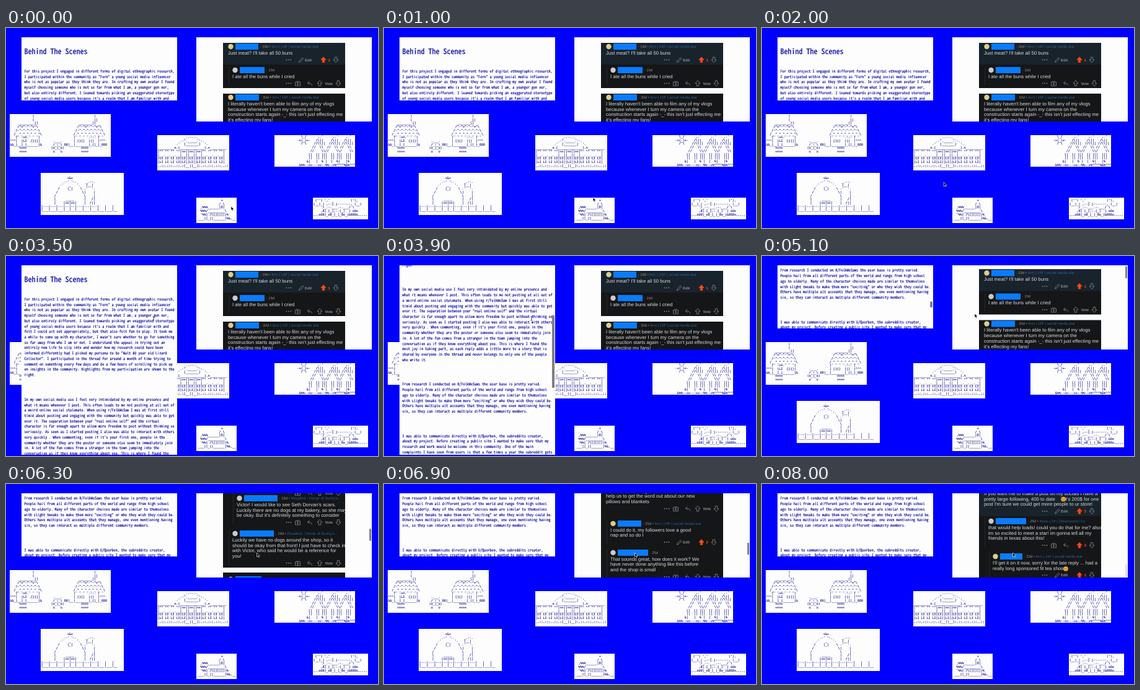
Animation of 600x323 px, one loop 8.1 s. Source, as an HTML page:

```html
<!DOCTYPE html>
<html lang="en">
<head>
<meta charset="utf-8">
<style>
html, body { margin: 0; width: 100%; height: 100%; overflow: hidden; background: #0000fe; }
svg { display: block; width: 600px; height: 323px; }
text { white-space: pre; text-rendering: geometricPrecision; }
.art { font: 5px "DejaVu Sans Mono", monospace; fill: #10108c; stroke: #10108c; stroke-width: .12px; }
.prose { font: 6.15px "Noto Sans Mono CJK JP", "Liberation Mono", monospace; fill: #0a0aa4; stroke: #0a0aa4; stroke-width: .15px; }
.title { font-size: 12px; stroke-width: .25px; }
.feed { font: 7.8px "Liberation Sans", Arial, sans-serif; fill: #d7dadc; }
.small { font-size: 6px; fill: #8a8d90; }
.line { fill: none; stroke: #8a8d90; stroke-width: .8px; }
</style>
</head>
<body>
<svg id="stage" viewBox="0 0 600 323"></svg>
<script>
const LOOP = 8100, STEP = 100, PITCH = 8.72, FEED_PITCH = 8.8;
const PAPER = '#fdfdfd', DARK = '#151618', OWN = '#19232c', ORANGE = '#ff4a12';

const esc = s => s.replace(/&/g, '&amp;').replace(/</g, '&lt;');
const rect = (x, y, w, h, fill, more = '') =>
  `<rect x="${x}" y="${y}" width="${w}" height="${h}" fill="${fill}" ${more}/>`;
const text = (x, y, s, more = '') => `<text x="${x}" y="${y}" ${more}>${esc(s)}</text>`;
const dot = (x, y, r, fill) => `<circle cx="${x}" cy="${y}" r="${r}" fill="${fill}"/>`;

// ASCII buildings: x, y, width, height, first baseline, drawing
const art = [
[6, 139, 163, 69, 144, String.raw`
            )                                (
            (                                []
     ________[]                      _______[]
    /^=^-^-^=^\                     /^-^=^-^-^=^\
   /-^-^-^-^-^-\                   /-^-^-^-^-^-^-\
  /__^_^_^_^_^_^\                 /_^_^_^_^_^_^_^_\
   |  .==.     |                  |       .--. |
^^^|  |LI  [}{]|       .___.      | [}{]  |[]  |^^^
&&_|__|_|______|&      /_:_\ 88|__|_______|_[]_|_888
     ====             (o_|_o)         ====
     ====              u   u          ====`],
[244, 173, 116, 57, 178, String.raw`
              _..--.._
            .-'._____.'-.
          .'  [_______]  '.
_________n.[_____________].n_________
|"" "" "" ""|==||==||==|"" "" "" ""|
|__.__.__.__|__||__||__|__.__.__.__|
|LI LI LI LI|LI||LI||LI|LI LI LI LI|
|LI LI LI LI|LI||LI||LI|LI LI LI LI|
,,;;,;;;,,;;,;[__||__];,;;,;;;,;;;,,;;`],
[433, 173, 130, 51, 177, String.raw`
              \_/      ,.'     ,.'    ,.'
            -=(_)=-   /\||    /\||   /\||
              / \    //\\||  //\\|| //\\||
                    //  \\  //  \\ //  \\
                   //    \\//    \\/    \\
                  []  [] |[]  [] |[]  []|
                  ||  || |||  || |||  |||
                 &|   |  % |  |  %|   |%
             &%%--==---==--%%--=%^^^^%&%^^^`],
[56, 234, 134, 68, 244, String.raw`
              +&+
            .-' '-.     _.--.
          .'   _   '.   |__|
         /    |_|    \ .'  '.
        /             \|    |
       /               \    |
       |     _____     |   /|
       |    |==|==|    |  /||
|---|---|---|--|--|---|---|---|   |   |
|___|___|___|__|__|___|___|___|___|___|__`],
[307, 274, 65, 41, 280, String.raw`
             +
            /_\
  ,%%%______|O|
  %%%/_________\
  '%%| /\[][][]|%
 ___||_||______|%&,__`],
[495, 274, 89, 35, 280, String.raw`
 ('') ',' _         ('),
(__)_) ,--j j-------, (__)
     /_.-.___.-.___/ \
    ,8| [_],-.[_]  | oOo
,,,oO8|_o8_|_|_8o_|&888o,,,,,`]];

const artPanel = ([x, y, w, h, base, s]) => rect(x, y, w, h, PAPER) +
  s.slice(1).split('\n').map((row, i) => text(x + .5, base + i * 5.7, row, 'class="art"')).join('');

const essay = [
`For this project I engaged in different forms of digital ethnographic research,
I participated within the community as "Fern" a young social media influencer
who is not as popular as they think they are. In crafting my own avatar I found
myself choosing someone who is not so far from what I am, a younger gen xer,
but also entirely different. I leaned towards picking an exaggerated stereotype
of young social media users because it's a realm that I am familiar with and
felt I could act out appropriately, but that also felt fun to play. It took me
a while to come up with my character, I wasn't sure whether to go for something
so far away from who I am or not. I understand the appeal in trying out an
entirely new life to slip into and wonder how my research could have been
informed differently had I picked my persona to be "Walt 80 year old Lizard
Collector". I participated in the thread for around a month of time trying to
comment on something every few days and do a few hours of scrolling to pick up
on insights in the community. Highlights from my participation are shown to the
right.`,
`In my own social media use I feel very intimidated by my online presence and
what it means whenever I post. This often leads to me not posting at all out of
a weird online social stalemate. When using r/FolkWeSaw I was at first still
timid about posting and engaging with the community but quickly was able to get
over it. The separation between your "real online self" and the virtual
character is far enough apart to allow more freedom to post without thinking so
seriously. As soon as I started posting I also was able to interact with others
very quickly . When commenting, even if it's your first one, people in the
community whether they are the poster or someone else seem to immediately join
in. A lot of the fun comes from a stranger in the town jumping into the
conversation as if they know everything about you. This is where I found the
most joy in taking part, as each reply adds a little more to a story that is
shared by everyone in the thread and never belongs to only one of the people
who write it.`,
`From research I conducted on R/FolkWeSaws the user base is pretty varied.
People hail from all different parts of the world and range from high school
age to elderly. Many of the character choices made are similar to themselves
with slight tweaks to make them more "exciting" or who they wish they could be.
Others have multiple alt accounts that they manage, one even mentioning having
six, so they can interact as multiple different community members.`,
`I was able to communicate directly with U/Quorben, the subreddits creator,
about my project. Before creating a public site I wanted to make sure that my
research and work would be welcome in this community. One of the main
complaints I have seen from users is that a few times a year the subreddit gets
attention by other means, posts in other subreddits or online areas, that cause
an influx of users that don't bother to read the comments. Recently there had
been an influx that caused a lot of drama, one new user created a post claiming
that hundreds of towns members had died in a shooting which ended up killing
off some peoples characters and causing contradictions in peoples storylines.
This was heavily complained about in the meta subreddit, r/folkwesaws, and many
were frustrated with the new users. I brought my research, questions, and
proposal to the mod letting them know my hesitancy in posting as I did not want
to disrupt the community environment. The conversation I had with them was
enthusiastic and showed how much the creator loves the community they created
on a whim based on a post of theirs in an unrelated subreddit. I am still in
communication with them about how modding goes, what the community was like
when it started, and how it's evolved since. It has been interesting to learn
through post history how they shifted from using pictures to just text based
interactions. Also to learn there are many long term users along with new
people popping into town periodically. In my own research I noted many people
who posted everyday and in r/FolkWeSaw there were a few users who thanked the
subreddit for allowing an escape and friendship during quarantine. The
subreddit may seem like it's all jokes but it has allowed for community
building and connection to be fostered on a unique platform.`];

const stage = document.getElementById('stage');
const pen = document.createElement('canvas').getContext('2d');
pen.font = '100px "Noto Sans Mono CJK JP", "Liberation Mono", monospace';
const advance = pen.measureText('0').width / 100;
const spaced = (size, step) => `letter-spacing="${(step - advance * size).toFixed(3)}"`;

function prose() {
  let y = 72, out = text(29.5, 42.4, 'Behind The Scenes', `class="title" ${spaced(12, 6)}`);
  for (const para of essay) {
    for (const row of para.split('\n')) {
      out += text(29.5, y, row, spaced(6.15, 3.07));
      y += PITCH;
    }
    y += 39.7 - PITCH;
  }
  return out;
}

const arrow = (x, y, flip, on) =>
  `<path class="line" transform="translate(${x} ${y}) scale(1 ${flip})" d="M0-4.5 4 0H1.7V4.2H-1.7V0H-4z" ${on ? `style="fill:${ORANGE};stroke:${ORANGE}"` : ''}/>`;

function actions(y, own, votes) {
  let out = [452.5, 456, 459.5].map(x => dot(x, y, .9, '#8a8d90')).join('');
  out += own
    ? `<path class="line" d="M472.5 ${y + 4}l.7-2.4 5-5 1.7 1.7-5 5z"/>` + text(482, y + 2.2, 'Edit', 'class="small" font-weight="600"')
    : `<path class="line" d="M466.5 ${y - 2}h8v6h-8zM470.5 ${y - 1}v4M468.5 ${y + 1}h4M468.5 ${y - 3.7}l2 1.7 2-1.7M493.5 ${y + 3.5}q0-4-7-4m3-3-3 3 3 3"/>`;
  return out + (votes
    ? arrow(512, y, 1, true) + text(519.5, y + 2.2, String(votes), `class="small" style="fill:${ORANGE}" font-weight="700"`) + arrow(532, y, -1)
    : arrow(506, y, 1) + text(514.5, y + 2.2, 'Vote', 'class="small" font-weight="600"') + arrow(536, y, -1));
}

function post(y, x, bar, age, flair, rows, own, votes) {
  const list = rows.split('\n'), end = y + 11 + (list.length - 1) * FEED_PITCH;
  return dot(x + 4.5, y, 4.2, own ? '#d9cf8e' : '#c9cccf') + rect(x + 12, y - 5, bar, 10, '#0a7cff') +
    `<text class="small" x="${x + bar + 14.5}" y="${y + 1.8}">· ${age}${flair && ` • <tspan fill="#2464a0">${esc(flair)}</tspan>`}</text>` +
    list.map((row, i) => text(x, y + 12.8 + i * FEED_PITCH, row)).join('') +
    (x > 358 ? rect(x - 6, y - 5, .5, end - y + 18, '#34373a') : '') +
    actions(end + 10.3, own, votes);
}
const block = (y, h, own = 0) => rect(350, y, 197, h, DARK) + rect(350, y, 197, own, OWN);
const smile = (x, y, mouth) => dot(x, y, 3.7, '#f8b83c') + dot(x - 1.3, y - .8, .6, '#5a3818') +
  dot(x + 1.3, y - .8, .6, '#5a3818') + `<path d="M${x - 1.8} ${y + 1}q1.8 2 3.6 0" fill="none" stroke="${mouth}" stroke-width=".7"/>`;

const star = 'fern | 19F | social media star', owner = "Rosalind - Owner of Sunny's...";
const feed = () => [
  block(24, 73, 35),
  post(30, 358, 37, '19d', star, "Just meat? I'll take all 50 buns", true, 1),
  post(68, 365, 40, '19d', '', 'I ate all the buns while I cried'),
  block(106, 102),
  post(112, 358, 38, '30d', star, `I literally haven't been able to film any of my vlogs
because whenever I turn my camera on the
construction starts again -_- this isn't just effecting me
it's effecting my fans!`, true, 2),
  post(178, 365, 44, '30d', '', 'The noise should be over by next week'),
  block(217, 299),
  post(223, 358, 38, '19d', star, 'Has anyone seen the new bakery in town?\nI want to film something there', true, 2),
  post(270, 365, 55, '19d', owner, 'You are welcome to come by any time! We\nare open every day and the bread is always\nfresh in the morning'),
  post(325, 365, 48, '19d', '', 'I was there today and it was great, but\nplease leave the dogs at home'),
  post(374, 372, 40, '19d', '', 'What about the dogs?'),
  post(404, 372, 54, '19d', owner, `Victor! I would like to see Seth Dorvan's scars.
Luckily there are no dogs at my bakery, so she may
be okay. But it's definitely something to consider`),
  post(461, 365, 55, '19d', owner, `Luckily we have no dogs around the shop, so it
should be okay from that front! I just have to check in
with Victor, who said he would be a reference for
you!`),
  block(524, 236),
  post(535, 358, 42, '25d', '', 'Our store is looking for someone who can\nhelp us to get the word out about our new\npillows and blankets'),
  post(598, 365, 38, '25d', star, 'I could do it, my followers love a good\nnap and so do I', true, 2),
  post(645, 365, 49, '25d', '', 'That sounds great, how does it work? We\nhave never done anything like this before\nand the shop is small'),
  post(710, 372, 44, '25d', '', 'I would come to the store to see this\nhappen'),
  block(769, 156, 53),
  post(775, 358, 38, '25d', star, `If you want me to make a post on my socials I have a
pretty large following, 400 to date     , it's 200$ for one
post I'm sure we could get more people to ur store!`, true, 3),
  smile(486, 794.5, '#a03020'),
  post(830, 365, 49, '25d', 'Moss | 44 | Dreamywool Co', `that would help loads! could you do that for me? also
im so excited to meet a star! im gonna tell all my
friends in texas about this!`, false, 3),
  post(887, 372, 36, '23d', star, "I'll get it on it now, sorry for the late reply ... had a\nreally long sponsored fit tea shoot", true, 1),
  smile(490, 907, '#d03030')
].join('');

stage.innerHTML = `
<clipPath id="feedClip"><rect x="307" y="15" width="283" height="136"/></clipPath>
<clipPath id="essayClip"><rect id="essayCut" x="25" y="15" width="251" height="102"/></clipPath>
${art.map(artPanel).join('')}
${rect(307, 15, 283, 136, PAPER)}
<g clip-path="url(#feedClip)"><g id="feed" class="feed">${feed()}</g></g>
${rect(586, 16, 3, 20, '#808080', 'id="feedBar" rx="1.5"')}
${rect(25, 15, 251, 102, PAPER, 'id="essayPaper"')}
<g clip-path="url(#essayClip)"><g id="essay" class="prose">${prose()}</g></g>
${rect(271, 15, 4, 10, '#808080', 'id="essayBar" rx="2"')}
<path id="arrow" d="M0 0V6.6L1.6 5.2 2.7 7.6 3.9 7 2.8 4.8H4.8z" fill="#000" stroke="#fff" stroke-width=".6"/>
<path id="beam" d="M-1.5-3.2Q0-3.2 0-2.2Q0-3.2 1.5-3.2M0-2.2V2.2M-1.5 3.2Q0 3.2 0 2.2Q0 3.2 1.5 3.2" fill="none" stroke="#222" stroke-width=".8"/>`;

const set = (id, attrs) => {
  for (const k in attrs) document.getElementById(id).setAttribute(k, attrs[k]);
};

// Eased value at time t along [time, value] keys
function along(keys, t) {
  const i = keys.findIndex(k => k[0] > t);
  if (i < 0) return keys[keys.length - 1][1];
  if (i === 0) return keys[0][1];
  const [t0, a] = keys[i - 1], [t1, b] = keys[i], p = (t - t0) / (t1 - t0);
  return a + (b - a) * p * p * (3 - 2 * p);
}
const mouseX = [[300, 363], [2000, 293], [2200, 293], [3100, 238], [4500, 238], [5100, 343], [5600, 404.5]];
const mouseY = [[300, 288], [2000, 249], [2200, 249], [3100, 101], [4500, 101], [5100, 93], [5600, 111]];
const essayScroll = [[3500, 0], [4300, 354.8], [4500, 361.4]];
const feedScroll = [[5040, 0], [6300, 381], [7700, 770]];

function draw(now) {
  const t = Math.floor(now % LOOP / STEP) * STEP;
  const x = along(mouseX, t), y = along(mouseY, t);
  const open = x < 276 && y < 117, height = open ? 306 : 102;
  const read = along(essayScroll, t), fed = along(feedScroll, t);
  set('essayCut', { height });
  set('essayPaper', { height });
  set('essay', { transform: `translate(0 ${-read})` });
  set('essayBar', {
    y: 15 + read * (open ? .452 : .161), height: open ? 118 : 10,
    opacity: t > 3500 && t < 5500 ? 1 : 0
  });
  set('feed', { transform: `translate(0 ${-fed})` });
  set('feedBar', { y: 16 + fed * .147, opacity: t < 5000 ? 0 : t < 7900 ? 1 : .25 });
  const place = `translate(${x} ${y})`;
  set('arrow', { transform: place, opacity: open ? 0 : 1 });
  set('beam', { transform: place, opacity: open ? 1 : 0 });
  requestAnimationFrame(draw);
}
draw(0);
</script>
</body>
</html>
```
